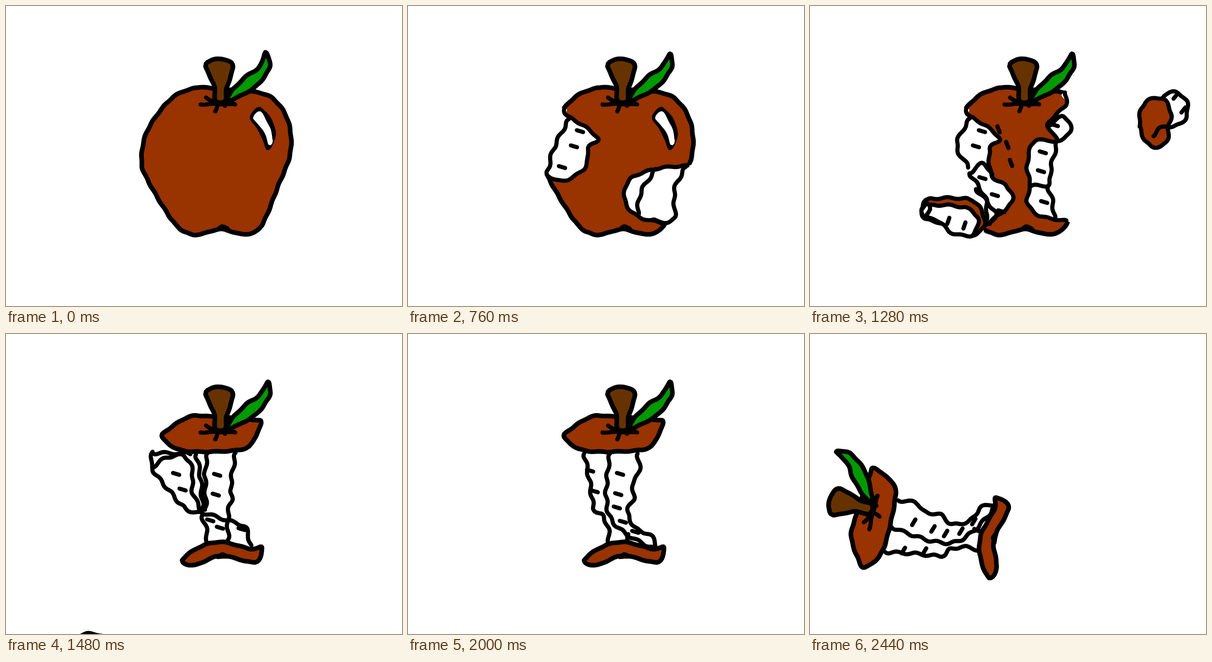
An HTML page with a canvas for the animation above (2.84 s loop, 859 px wide and 652 px high).

```html
<!DOCTYPE html>
<html lang="en">
<head>
<meta charset="utf-8">
<title>Apple being eaten</title>
<style>
  html, body { margin: 0; height: 100%; overflow: hidden; background: #fff; }
  canvas { display: block; }
</style>
</head>
<body>
<canvas id="stage" width="859" height="652"></canvas>
<script>
const ctx = document.getElementById('stage').getContext('2d');
const LOOP = 2840, STEP = 40;
const RED = '#993300', GREEN = '#009900', BROWN = '#663300', WHITE = '#fff', BLACK = '#000';
const SKIN_WAVE = 0.7, FLESH_WAVE = 2.5;
ctx.lineCap = ctx.lineJoin = 'round';

const parse = text => text.split(' ').map(s => s.split(',').map(Number));
const spline = (a, b, c, d, u) =>
  b + u / 2 * (c - a + u * (2 * a - 5 * b + 4 * c - d + u * (3 * (b - c) + d - a)));

// Builds a hand-drawn curve through key points, rippling along its normal.
function trace(points, closed, wave) {
  const p = parse(points), n = p.length;
  const at = i => closed ? p[(i + n) % n] : p[Math.max(0, Math.min(n - 1, i))];
  let run = 0;
  ctx.beginPath();
  for (let i = 0; i < (closed ? n : n - 1); i++) {
    const [a, b, c, d] = [at(i - 1), at(i), at(i + 1), at(i + 2)];
    const length = Math.hypot(c[0] - b[0], c[1] - b[1]);
    const steps = Math.max(2, Math.round(length / 4));
    for (let j = 0; j <= steps; j++) {
      const u = j / steps, ripple = wave * Math.sin((run + u * length) / 6);
      const tx = (c[0] - a[0]) * (1 - u) + (d[0] - b[0]) * u;
      const ty = (c[1] - a[1]) * (1 - u) + (d[1] - b[1]) * u;
      const size = Math.hypot(tx, ty) || 1;
      ctx.lineTo(spline(a[0], b[0], c[0], d[0], u) - ripple * ty / size,
                 spline(a[1], b[1], c[1], d[1], u) + ripple * tx / size);
    }
    run += length;
  }
  if (closed) ctx.closePath();
}

function fill(color) {
  ctx.fillStyle = color;
  ctx.fill();
}

function stroke(width) {
  ctx.lineWidth = width;
  ctx.stroke();
}

function shape(points, color, width = 10, wave = SKIN_WAVE) {
  trace(points, true, wave);
  fill(color);
  if (width) stroke(width);
}

function line(points, wave = FLESH_WAVE) {
  trace(points, false, wave);
  stroke(9);
}

// Short dashes around the given centres, all leaning the same way.
function seeds(points, angle = 0.3) {
  const dx = 7 * Math.cos(angle), dy = 7 * Math.sin(angle);
  for (const [x, y] of parse(points)) {
    ctx.beginPath();
    ctx.moveTo(x - dx, y - dy);
    ctx.lineTo(x + dx, y + dy);
    stroke(9);
  }
}

const APPLE = '452,180 416,177 360,200 308,268 294,332 306,376 362,468 395,494 422,496 466,485 516,496 553,479 590,392 617,318 612,250 580,202 535,186';
const CAP = '452,180 400,179 355,205 339,224 372,250 425,256 515,250 540,225 553,192 535,186';
const BASE = '382,492 420,463 468,452 530,467 555,464 540,496 466,482 410,502';

// Each hole is an inner edge plus outside points that close the removed area.
const LEFT = [
  { until: 40 },
  { until: 860, edge: '339,222 345,238 385,263 412,290 391,308 385,350 338,380 301,368', out: '250,360 260,220',
    flesh: ['349,246 316,310 302,366'], seeds: '373,272 360,305 334,350' },
  { until: 1080, edge: '339,222 345,238 385,263 412,290 391,308 385,348 376,358 408,415 400,460 360,466', out: '270,480 250,220',
    flesh: ['349,246 320,302 350,358', '350,357 385,352', '354,360 345,415 360,466'],
    seeds: '373,272 360,305 358,375 367,406 373,441' },
  { until: 1480, edge: '339,222 345,238 385,263 411,290 390,310 394,368 428,393 437,428 378,478', out: '366,490 220,470 250,220',
    flesh: ['347,244 318,303 345,350', '346,364 376,342 394,368', '346,364 382,422 380,475', '360,398 402,450 390,474'],
    seeds: '373,272 360,305 374,374 401,411 415,446' }
];

const RIGHT = [
  { until: 360 },
  { until: 440, flesh: ['617,353 588,348 572,388 560,412 545,440'] },
  { until: 800, edge: '606,347 538,354 480,378 471,425 500,458 556,472', out: '680,480 680,340',
    flesh: ['602,350 578,400 576,465 530,466', '538,354 505,405 498,455'] },
  { until: 1080, edge: '548,188 550,212 516,260 536,288 549,325 538,354 480,378 471,425 500,458 556,472', out: '680,500 680,180',
    flesh: ['516,262 548,236 588,300 580,365 576,465 530,466', '530,262 556,314', '538,354 505,405 498,455',
            '510,403 517,460'],
    seeds: '572,290 573,328 553,351' },
  { until: 1480, edge: '553,188 555,214 516,258 537,293 486,294 471,350 478,388 471,425 496,455 556,467', out: '680,500 680,180',
    flesh: ['516,260 552,240 565,275 537,293', '537,293 522,355 518,388 480,390', '516,393 526,425 530,460'],
    seeds: '531,259 505,318 501,359 508,426' }
];

const SLIVER = '318,258 317,292 358,345 390,380 425,390 404,340 404,295 384,265';
const CORE = [
  { until: 1720, seeds: '369,304 383,338 458,306 455,349 464,421 511,424 443,405',
    flesh: ['318,256 317,292 358,345 390,380 425,390', '318,259 400,259',
            '317,290 350,268 388,266 405,300 404,340 425,388', '412,262 421,305 427,382',
            '438,258 432,300 434,382', '498,258 488,325 490,355 482,390 482,450',
            '425,388 490,408 520,422 530,460', '425,395 436,432 434,458'] },
  { until: Infinity, seeds: '395,297 405,342 460,304 456,348 453,377 466,408 493,430',
    flesh: ['382,260 394,320 404,380 424,397 436,432 434,458',
            '438,260 433,300 430,355 440,402 478,438 530,465',
            '498,260 502,300 487,322 490,355 476,388 497,425 525,436 540,463', '478,435 478,450'] }
];

// Chunks drawn where they are at `seen`; speed in px/ms, spin in degrees/ms.
const CHUNKS = [
  { from: 40, to: 480, seen: 40, center: [350, 300], speed: [0.53, -0.96], spin: -0.5,
    parts: [['339,222 304,275 294,337 338,380 391,308 412,290 385,263', RED]] },
  { from: 440, to: 760, seen: 440, center: [550, 410], speed: [0.35, 0.3], gravity: 0.006, spin: 0.3,
    parts: [['612,354 576,422 553,472 490,455 470,418 480,378 538,354', RED]] },
  { from: 800, to: 1120, seen: 1000, center: [556, 30], speed: [-0.1, -1.2], spin: -0.1,
    parts: [['514,-25 508,40 520,98 548,78 600,68 603,30 595,-35', WHITE],
            ['514,-25 508,40 520,98 548,78 598,68 592,25 570,-35', RED]] },
  { from: 860, to: 1160, seen: 1000, center: [270, 340], speed: [-0.75, 0.1], gravity: 0.008, spin: -0.2,
    parts: [['225,360 255,318 290,296 311,312 300,370 270,385 248,372', WHITE],
            ['225,360 255,318 284,298 275,330 260,366 240,371', RED]] },
  { from: 1080, to: 1400, seen: 1280, center: [768, 245], speed: [1.1, -0.42], spin: 0.1,
    parts: [['765,200 790,187 816,205 817,240 795,260 772,256', WHITE],
            ['715,262 724,213 762,200 783,230 778,262 772,298 738,304', RED]],
    flesh: ['745,283 754,268 778,262'], seeds: '793,196 810,226', lean: -0.9 },
  { from: 1240, to: 1520, seen: 1280, center: [303, 458], speed: [-0.7, 0.5], gravity: 0.008, spin: -0.3,
    parts: [['243,440 258,420 345,420 372,445 378,475 352,498 285,472 250,462', RED],
            ['254,458 262,434 335,438 364,462 352,498 305,492 284,470', WHITE],
            ['243,442 253,428 259,442 250,460', WHITE]],
    seeds: '300,467 335,477', lean: 1.9 },
  { from: 1520, to: 2000, seen: 1680, center: [655, 235], speed: [0.4, -1.1], spin: 0.1,
    parts: [['617,157 680,192 712,232 752,257 668,312 630,309 563,240', WHITE],
            ['585,212 640,234 680,262 706,283 665,298 612,275 567,236', RED]],
    flesh: ['633,194 622,222', '636,207 665,213 654,238', '698,234 680,260', '718,242 706,276', '612,290 640,284 662,303 640,311'] },
  { from: 1720, to: 2000, seen: 1720, center: [370, 320], speed: [-0.3, 0.5], gravity: 0.012, spin: -0.3,
    parts: [[SLIVER, WHITE]], seeds: '369,304 383,338' }
];

const pick = (stages, t) => stages.find(s => t < s.until);

function drawFlesh({ flesh = [], seeds: spots, lean }) {
  flesh.forEach(f => line(f));
  if (spots) seeds(spots, lean);
}

function drawHole(stage) {
  if (stage.edge) {
    trace(stage.edge + ' ' + stage.out, true, 0);
    fill(WHITE);
    line(stage.edge, 1.5);
  }
  drawFlesh(stage);
}

function drawTop(t) {
  const tip = t < 600 ? '563,101 572,122' : '568,104 573,122';
  shape(tip + ' 568,142 538,178 483,206 487,188 523,151 549,134', GREEN);
  shape('433,131 445,118 474,116 492,132 479,178 475,207 455,207 451,172', BROWN);
  ['422,214 460,213 497,214', '434,199 458,213', '454,229 459,214', '475,217 480,209 496,214']
    .forEach(l => line(l, SKIN_WAVE));
}

function drawNotch() {
  shape('457,486 468,476 484,485 467,487', BLACK, 4);
}

function drawApple(t) {
  shape(APPLE, RED);
  drawHole(pick(LEFT, t));
  drawHole(pick(RIGHT, t));
  if (t < 800) {
    shape('551,221 579,255 582,290 567,311 552,276 531,242', BLACK, 3);
    shape('536,244 551,229 570,259 579,293 570,301 558,270', WHITE, 0);
  } else if (t >= 1080) {
    seeds('409,268 428,302 436,341', 1.2);
  }
  drawNotch();
  drawTop(t);
}

function drawCore(t) {
  const u = Math.max(0, Math.min(1, (t - 2000) / 440));
  const fall = u + 0.36 * u * (1 - u);
  ctx.save();
  ctx.translate(380 + 11 * fall, 495 + 38 * fall);
  ctx.rotate(-76 * fall * Math.PI / 180);
  ctx.translate(-380, -495);
  drawFlesh(pick(CORE, t));
  shape(CAP, RED);
  shape(BASE, RED);
  drawNotch();
  drawTop(t);
  ctx.restore();
}

function drawChunk(chunk, t) {
  if (t < chunk.from || t >= chunk.to) return;
  const { center: [x, y], speed: [vx, vy], gravity = 0, spin } = chunk;
  const age = t - chunk.seen;
  ctx.save();
  ctx.translate(x + vx * age, y + vy * age + gravity * age * age / 2);
  ctx.rotate(spin * age * Math.PI / 180);
  ctx.translate(-x, -y);
  chunk.parts.forEach(([points, color]) => shape(points, color, 9, 1.8));
  drawFlesh(chunk);
  ctx.restore();
}

function frame() {
  const t = Math.floor(performance.now() % LOOP / STEP) * STEP;
  ctx.fillStyle = WHITE;
  ctx.fillRect(0, 0, 859, 652);
  (t < 1480 ? drawApple : drawCore)(t);
  CHUNKS.forEach(chunk => drawChunk(chunk, t));
  requestAnimationFrame(frame);
}
frame();
</script>
</body>
</html>
```
